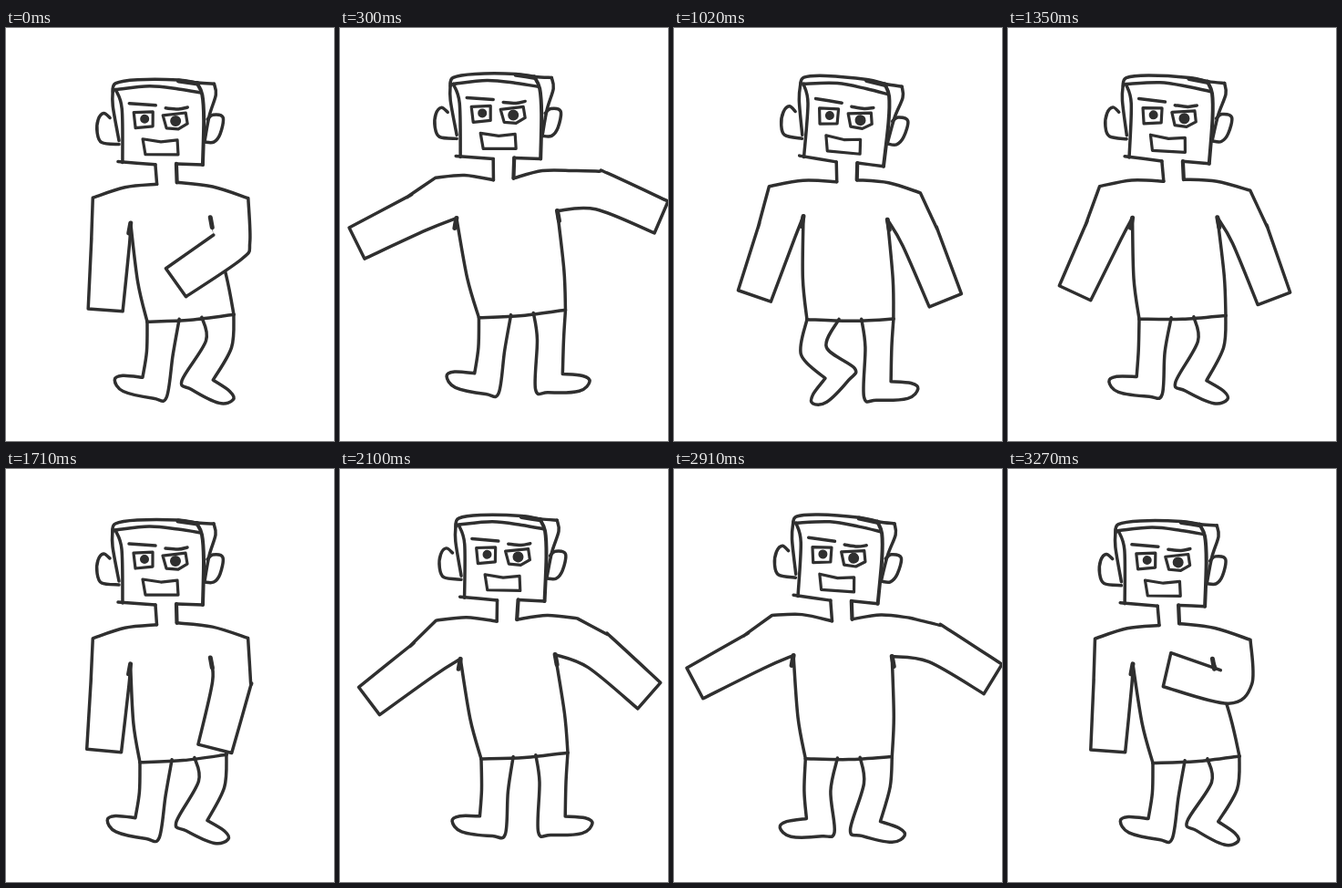
These frames come from a looping animation (360x453 px, 3300 ms). An HTML page with a canvas:

```html
<!DOCTYPE html>
<html lang="en">
<head>
<meta charset="utf-8">
<title>Dancing doodle</title>
<style>
  html, body { margin: 0; width: 100%; height: 100%; overflow: hidden; background: #fff; }
  canvas { display: block; }
</style>
</head>
<body>
<canvas id="stage" width="360" height="453"></canvas>
<script>
const ctx = document.getElementById('stage').getContext('2d');
const INK = '#2f2f2f', PEN = 3.5;
const STEPS = 33, BEAT = STEPS / 2; // the loop holds two cycles of two beats
const RAD = Math.PI / 180;
const LEFT = -1, RIGHT = 1;

// Hip sway: [step, shift]
const HIPS = [[0, 0], [1, -8], [9, 0], [13, -16], [19, -9], [27, -11], [32, 4], [33, 0]];
// Foot outline around the ankle: [toward toe, down the shin]
const FOOT = [[15, -9], [37, -8], [45, -2], [34, 9], [0, 12], [-14, 9]];

const wave = (step, peak, period) => Math.cos(2 * Math.PI * (step - peak) / period);
const lerp = (a, b, u) => [a[0] + (b[0] - a[0]) * u, a[1] + (b[1] - a[1]) * u];
const move = (p, v, k) => [p[0] + v[0] * k, p[1] + v[1] * k];

// Periodic bell of height 1; a higher power flattens its top
function bump(step, peak, width, period = STEPS, power = 2) {
  const turn = (step - peak) / period;
  const d = (turn - Math.round(turn)) * period;
  return Math.exp(-Math.pow(Math.abs(d) / width, power));
}

function ease(keys, step) {
  const i = keys.findIndex(k => k[0] > step);
  const [a, b] = [keys[i - 1], keys[i]];
  const u = (step - a[0]) / (b[0] - a[0]);
  return a[1] + (b[1] - a[1]) * u * u * (3 - 2 * u);
}

// Limb axis and its outward normal; angles open outward from straight down
const along = (side, deg) => [side * Math.sin(deg * RAD), Math.cos(deg * RAD)];
const outward = (side, deg) => [side * Math.cos(deg * RAD), -Math.sin(deg * RAD)];

// Smooth curve through points; continues the current path
function curve(pts) {
  ctx.lineTo(...pts[0]);
  for (let i = 0; i < pts.length - 1; i++) {
    const a = pts[i], b = pts[i + 1], p = pts[i - 1] || a, q = pts[i + 2] || b;
    ctx.bezierCurveTo(a[0] + (b[0] - p[0]) / 6, a[1] + (b[1] - p[1]) / 6,
      b[0] - (q[0] - a[0]) / 6, b[1] - (q[1] - a[1]) / 6, ...b);
  }
}

function stroke(pts, width = PEN) {
  ctx.lineWidth = width;
  ctx.beginPath();
  curve(pts);
  ctx.stroke();
}

function box(...pts) {
  ctx.lineWidth = 3.2;
  ctx.beginPath();
  pts.forEach(p => ctx.lineTo(...p));
  ctx.closePath();
  ctx.stroke();
}

function dot(x, y, r) {
  ctx.beginPath();
  ctx.arc(x, y, r, 0, 7);
  ctx.fill();
}

// Each beat lifts both arms; once per cycle the forearm folds over the body
function armPose(side, step, body) {
  const t = side === RIGHT ? step : step + 16.3;
  const lift = bump(t, 7, 3, BEAT), fold = bump(t, 31.3, 2);
  const upper = 2 + (side === RIGHT ? 100 : 68) * lift;
  const lower = 4 + 70 * lift - 121 * fold;
  const joint = [182.5 + side * 64.5 + body.chestX,
    197 + side * body.tilt + body.chestY - upper * 0.16];
  const elbow = move(joint, along(side, upper), 38);
  const wrist = move(elbow, along(side, lower), 74);
  const half = outward(side, upper / 2), down = along(side, upper / 2);
  const outLow = outward(side, lower);
  return {
    side,
    folded: upper - lower > 50,
    shoulder: move(move(joint, half, 21), down, -11),
    armpit: move(move(joint, half, -21), down, side === RIGHT ? 9 : 16),
    outer: [move(elbow, outward(side, upper), 21), move(elbow, outLow, 21), move(wrist, outLow, 19)],
    inner: [move(wrist, outLow, -19), move(elbow, outward(side, (upper + lower) / 2), -21)]
  };
}

function drawArm(arm, neck) {
  const { shoulder, armpit, outer, inner, folded, side } = arm;
  const collar = move(lerp(neck, shoulder, 0.5), [0, -1], 4);
  const outline = () => {
    ctx.beginPath();
    curve([neck, collar, shoulder]);
    curve([shoulder, ...outer]);
    curve(folded ? inner : [...inner, armpit]);
  };
  outline();
  ctx.lineTo(...armpit);
  ctx.fillStyle = '#fff';
  ctx.fill();
  outline();
  ctx.lineWidth = PEN;
  ctx.stroke();
  // Pen mark at the armpit
  stroke([armpit, move(armpit, [side * 2, 11], 1)], 5);
}

function drawLeg(side, hipOut, hipIn, thigh, shin, thighLen, shinLen) {
  const knee = move(lerp(hipOut, hipIn, 0.5), along(side, thigh), thighLen);
  const ankle = move(knee, along(side, shin), shinLen);
  const bend = outward(side, (thigh + shin) / 2);
  const foot = FOOT.map(([x, y]) =>
    move(move(ankle, outward(side, shin), x), along(side, shin), y));
  ctx.lineWidth = PEN;
  ctx.beginPath();
  curve([hipOut, move(knee, bend, 14.5), foot[0]]);
  curve([...foot, move(knee, bend, -14.5), hipIn]);
  ctx.stroke();
}

function drawHead() {
  // Hair and face
  stroke([[118, 66], [118, 85], [125, 123]]);
  stroke([[121, 67], [128, 88], [129, 147]]);
  stroke([[118, 69], [121, 60], [145, 56], [190, 56], [211, 59], [229, 60]]);
  stroke([[229, 60], [231, 72], [224, 95], [219, 123]]);
  stroke([[121, 67], [158, 63], [190, 66], [215, 70]]);
  stroke([[210, 59], [216, 72], [218, 100], [217, 149]], 4);
  stroke([[190, 57], [211, 60]], 5);
  stroke([[124, 146], [165, 149]]);
  stroke([[217, 149], [188, 148]]);
  // Ears
  stroke([[115, 98], [108, 93], [102, 100], [101, 114], [106, 125], [125, 127]]);
  stroke([[222, 99], [228, 94], [239, 97], [236, 115], [229, 124], [219, 124]]);
  // Brows, eyes and mouth
  stroke([[136, 82], [165, 84]]);
  stroke([[176, 87], [190, 88], [200, 86]]);
  box([141, 92], [162, 91], [162, 107], [143, 109]);
  box([173, 95], [198, 92], [200, 104], [190, 110], [177, 109]);
  dot(153, 99, 5);
  dot(187, 101, 6);
  box([151, 121], [171, 124], [189, 122], [190, 138], [154, 138]);
}

function drawFigure(step) {
  const sway = -wave(step, 1, STEPS), bounce = wave(step, 15.5, BEAT);
  const body = {
    tilt: 2.5 - 2.8 * wave(step, 3.5, STEPS),
    chestX: 2 + 4 * sway,
    chestY: -1 + 2.5 * bounce
  };
  const headX = 9 + 10 * sway, headY = -2.5 + 3.5 * bounce;
  const neckX = (headX + body.chestX) / 2;
  const neckL = [167 + neckX, 170 + body.chestY], neckR = [189 + neckX, 168 + body.chestY];
  const hemL = [155 + ease(HIPS, step), 320 + 2.5 * bounce];
  const hemR = [hemL[0] + 95, hemL[1] - 8.5 + 1.5 * body.tilt];

  ctx.fillStyle = '#fff';
  ctx.fillRect(0, 0, 360, 453);
  ctx.strokeStyle = INK;
  ctx.lineCap = ctx.lineJoin = 'round';

  const kick = bump(step, 18, 5.6);
  const thighL = 6 - 14 * bump(step, 13, 2.8) + 11 * bump(step, 19, 4);
  drawLeg(LEFT, hemL, lerp(hemL, hemR, 0.37), thighL, 8 - 66 * kick, 36, 38);
  const tuck = bump(step, 30.5, 6, STEPS, 4);
  drawLeg(RIGHT, hemR, lerp(hemL, hemR, 0.63), 2, -2 - 30 * tuck, 31, 46);

  const armL = armPose(LEFT, step, body), armR = armPose(RIGHT, step, body);
  stroke([armL.armpit, move(lerp(armL.armpit, hemL, 0.6), [-1, 0], 3), hemL]);
  stroke([hemL, move(lerp(hemL, hemR, 0.5), [0, 1], 2), hemR]);
  stroke([hemR, move(lerp(hemR, armR.armpit, 0.4), [1, 0], 2), armR.armpit]);
  drawArm(armL, neckL);
  drawArm(armR, neckR);

  // The neck joins the tilted head to the shoulders
  const cos = Math.cos(body.tilt * RAD), sin = Math.sin(body.tilt * RAD);
  const onHead = (x, y) => [153 + headX + (x - 153) * cos - (y - 99) * sin,
    99 + headY + (x - 153) * sin + (y - 99) * cos];
  stroke([onHead(165, 149), neckL]);
  stroke([onHead(188, 148), neckR], 4.2);
  ctx.save();
  ctx.translate(153 + headX, 99 + headY);
  ctx.rotate(body.tilt * RAD);
  ctx.translate(-153, -99);
  ctx.fillStyle = INK;
  drawHead();
  ctx.restore();
}

// Three steps every 150 ms, held 60, 60 and 30 ms
function stepAt(ms) {
  const rest = ms % 150;
  return (3 * Math.floor(ms / 150) + Math.min(2, Math.floor(rest / 60))) % STEPS;
}

const start = performance.now();
function tick() {
  drawFigure(stepAt((performance.now() - start) % 3300));
  requestAnimationFrame(tick);
}
tick();
</script>
</body>
</html>
```
